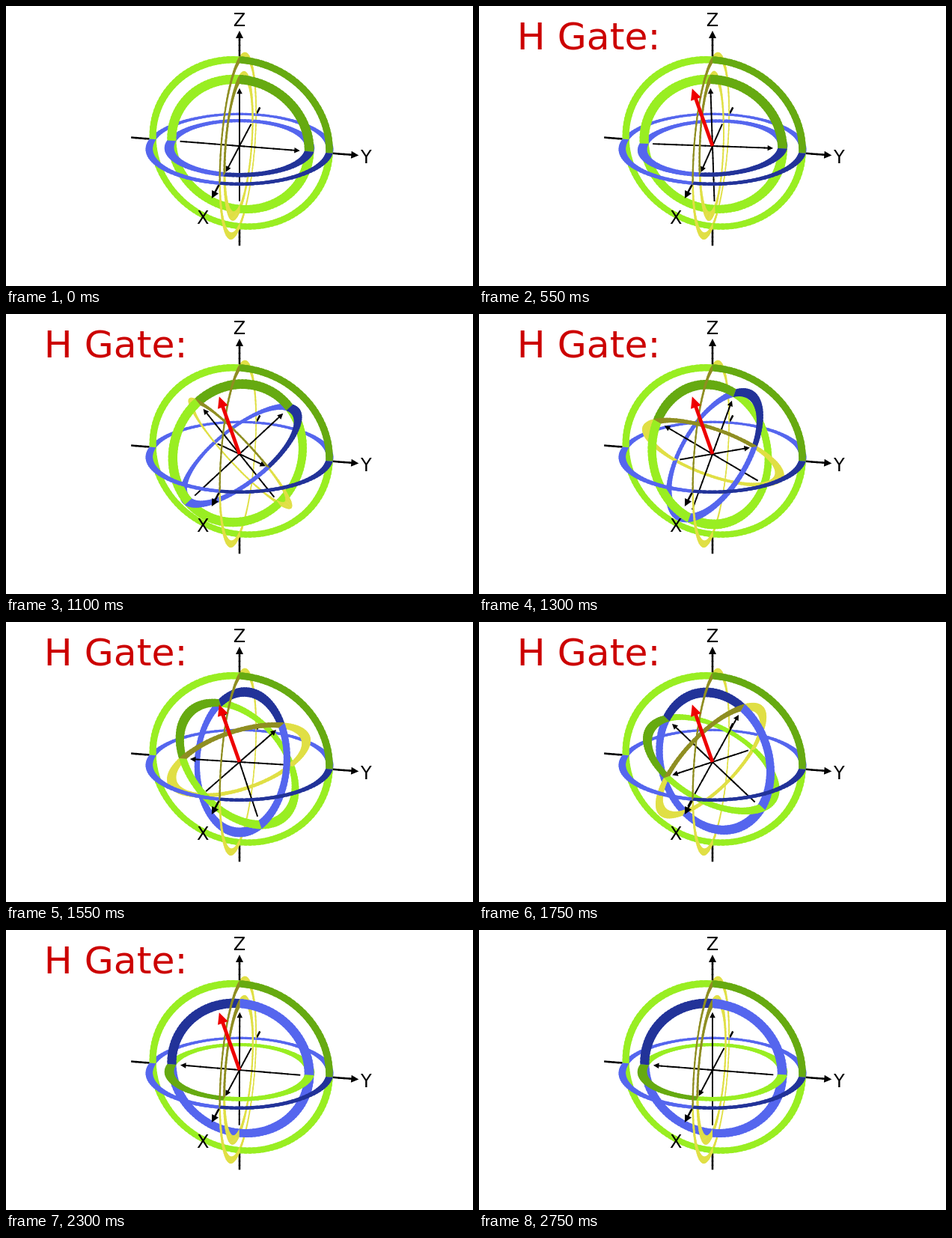
An HTML page with a canvas that plays this animation: 624 px wide and 374 px high, repeating every 3.8 s.

```html
<!DOCTYPE html>
<html>
<head>
<meta charset="utf-8">
<style>
html, body { margin: 0; width: 100%; height: 100%; overflow: hidden; background: #fff; }
canvas { display: block; }
</style>
</head>
<body>
<canvas id="stage" width="624" height="374"></canvas>
<script>
const ctx = document.getElementById('stage').getContext('2d');
const CX = 312, CY = 187, AZ = 0.2014, EL = 0.396, PERSP = 0.00078;
const STEP = 50, LOOP = 3800, LAST = 55, FADE = 7, TURN = 39;
const SEGS = 120;
const RINGS = [
  { a: 2, b: 0, light: '#e0df45', dark: '#8f8e22' },
  { a: 1, b: 2, light: '#99ee22', dark: '#66aa11' },
  { a: 0, b: 1, light: '#5566ee', dark: '#223399' }
];

const sinA = Math.sin(AZ), cosA = Math.cos(AZ);
const sinE = Math.sin(EL), cosE = Math.cos(EL);

function project([x, y, z]) {
  const front = x * cosA + y * sinA;
  const d = front * cosE + z * sinE;
  const k = 1 / (1 - d * PERSP);
  return { x: CX + (y * cosA - x * sinA) * k, y: CY - (z * cosE - front * sinE) * k, d };
}

// Rotation about the diagonal between X and Z
function turner(angle) {
  const c = Math.cos(angle), s = Math.sin(angle), h = Math.SQRT1_2;
  return ([x, y, z]) => {
    const m = (x + z) / 2 * (1 - c);
    return [x * c - h * y * s + m, y * c + h * (x - z) * s, z * c + h * y * s + m];
  };
}

function fillPoly(points, color) {
  ctx.fillStyle = color;
  ctx.beginPath();
  points.forEach(p => ctx.lineTo(p.x, p.y));
  ctx.fill();
}

function line(p, q, width, color) {
  ctx.strokeStyle = color;
  ctx.lineWidth = width;
  ctx.beginPath();
  ctx.moveTo(p.x, p.y);
  ctx.lineTo(q.x, q.y);
  ctx.stroke();
}

// Arrowhead pointing away from the centre, its tip a few pixels past the given end
function head(end, past, length, half, color) {
  const dx = end.x - CX, dy = end.y - CY, n = Math.hypot(dx, dy) || 1;
  const ux = dx / n, uy = dy / n;
  const at = (along, side) => ({ x: end.x + ux * along - uy * side, y: end.y + uy * along + ux * side });
  fillPoly([at(past, 0), at(past - length, half), at(past - length, -half)], color);
}

function addRings(parts, place, inner, outer) {
  for (const ring of RINGS) {
    const at = (i, r) => {
      const v = [0, 0, 0], t = i / SEGS * 2 * Math.PI;
      v[ring.a] = r * Math.cos(t);
      v[ring.b] = r * Math.sin(t);
      return project(place(v));
    };
    for (let i = 0; i < SEGS; i++) {
      const color = i < SEGS / 4 ? ring.dark : ring.light;
      // Overlap the next piece to hide seams, except where the colour changes
      const j = i + (i + 1 === SEGS / 4 || i + 1 === SEGS ? 1 : 1.6);
      const quad = [at(i, inner), at(i, outer), at(j, outer), at(j, inner)];
      parts.push({ d: at(i + 0.5, (inner + outer) / 2).d, draw: () => fillPoly(quad, color) });
    }
  }
}

function addAxes(parts, place, spans, width, past, size) {
  for (let axis = 0; axis < 3; axis++) {
    const at = r => {
      const v = [0, 0, 0];
      v[axis] = r;
      return project(place(v));
    };
    let end;
    for (const [from, to] of spans) {
      const n = Math.ceil((to - from) / 8), step = (to - from) / n;
      for (let i = 0; i < n; i++) {
        const r = from + i * step, p = at(r), q = at(Math.min(to, r + step * 1.2));
        parts.push({ d: at(r + step / 2).d, draw: () => line(p, q, width, '#000') });
      }
      end = at(to);
    }
    parts.push({ d: end.d, draw: () => head(end, past, size, size / 2, '#000') });
  }
}

function label(text, x, y, size, color, align) {
  ctx.font = size + 'px "DejaVu Sans", sans-serif';
  ctx.textAlign = align;
  ctx.fillStyle = color;
  ctx.fillText(text, x, y);
}

function render(frame) {
  const clamp = v => Math.max(0, Math.min(1, v));
  const u = clamp((frame - FADE - 1) / TURN);
  const alpha = Math.min(clamp(frame / FADE), clamp((LAST - frame) / FADE));
  const fixed = v => v, turned = turner(Math.PI * (1 - Math.cos(Math.PI * u)) / 2);
  const parts = [];
  addRings(parts, fixed, 115.6, 125);
  addRings(parts, turned, 87.5, 100);
  addAxes(parts, fixed, [[-151, -125], [125, 153]], 2.5, 6, 10);
  addAxes(parts, turned, [[-82, 77]], 1.9, 4.5, 7.5);

  ctx.fillStyle = '#fff';
  ctx.fillRect(0, 0, 624, 374);
  parts.sort((p, q) => p.d - q.d).forEach(p => p.draw());

  label('Z', 312, 26.5, 24, '#000', 'center');
  label('Y', 481.3, 209.7, 24, '#000', 'center');
  label('X', 263.3, 291, 24, '#000', 'center');

  ctx.globalAlpha = alpha;
  const neck = { x: 289, y: 122 };
  line({ x: CX, y: CY }, neck, 4.8, '#ee0000');
  head(neck, 12.5, 15, 7.2, '#ee0000');
  label('H Gate:', 50.8, 57.6, 50.4, '#cc0000', 'left');
  ctx.globalAlpha = 1;
}

const start = performance.now();
let shown = -1;
function tick() {
  const t = (performance.now() - start) % LOOP;
  const frame = Math.min(LAST, Math.floor(t / STEP));
  if (frame !== shown) render(shown = frame);
  requestAnimationFrame(tick);
}
tick();
</script>
</body>
</html>
```
